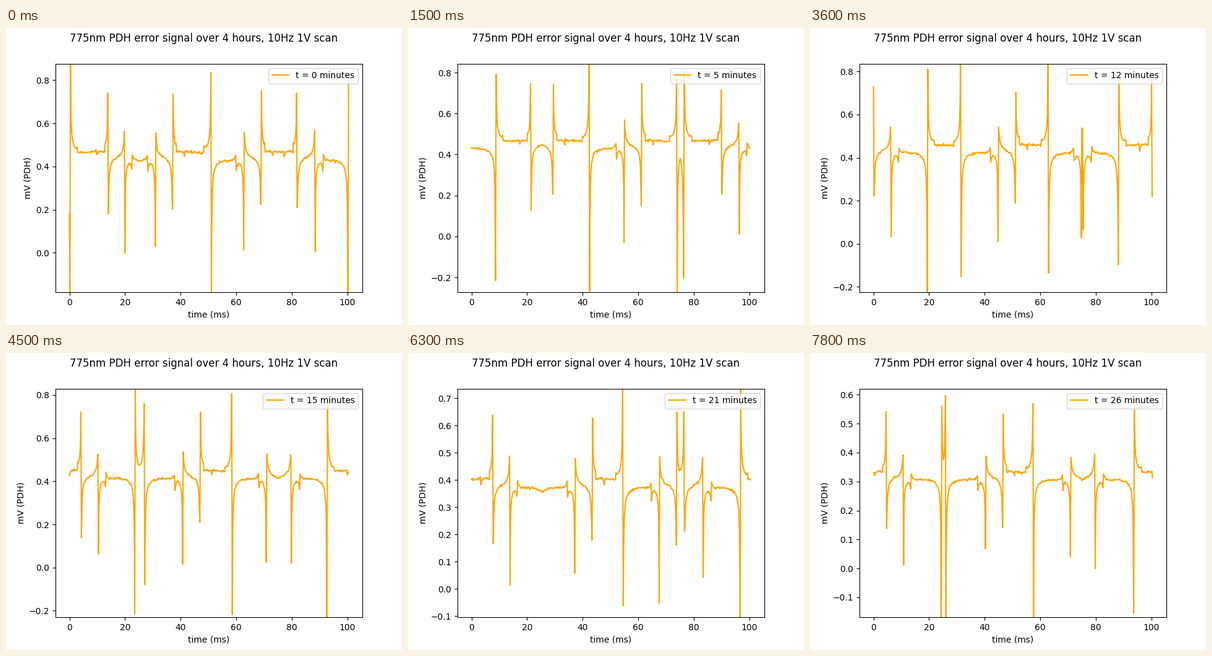
Write a matplotlib script that moves like this. It is 640 px wide and 480 px high and loops after 8000 ms.

```python
import numpy as np
import matplotlib.pyplot as plt
from matplotlib.animation import FuncAnimation

STEPS_PER_MINUTE = 3
LAST_MINUTE = 26
T_END = 100.4
TURN_1, TURN_2 = 25.2, 75.1  # ends of the triangular scan, ms

# Slow drift of the resonances and of the view, interpolated in between
KEY_MINUTES = [0, 5, 9, 12, 17, 21, 26]
DRIFT = [62.8, 55, 50.3, 44.95, 38.1, 37.3, 40.4]
Y_LOW = [-.183, -.273, -.156, -.225, -.235, -.104, -.169]
Y_HIGH = [.877, .8435, .8705, .8365, .825, .736, .621]


def at_minute(minute, values):
    return np.interp(minute, KEY_MINUTES, values)


def first_slope(u):
    """Time at which the first slope passes the point u of the middle one."""
    return 51.3 - .9 * np.exp(-(u - TURN_1) / 8) - u


def last_slope(u):
    return 151.4 - 1.2 * np.exp(-(TURN_2 - u) / 8) - u


def fold(t):
    """Map time to the equivalent point of the middle slope."""
    u = np.linspace(TURN_1, TURN_2, 1500)
    first = np.interp(t, first_slope(u)[::-1], u[::-1])
    last = np.interp(t, last_slope(u)[::-1], u[::-1])
    return np.where(t < TURN_1, first, np.where(t > TURN_2, last, t))


def resonances(minute):
    """(position, kind) of every resonance along the middle slope."""
    b = at_minute(minute, DRIFT)
    a = b - 11.8 - 2.6 * np.sin(np.pi / 2 * minute / LAST_MINUTE)
    modes = [(a + 31.5 * n, "A") for n in range(-1, 3)]
    for shift in (-31.8, 0, 29.4 + .045 * minute):
        modes += [(b + shift, "B"), (b + 6.2 + shift, "C")]
    return sorted(modes)


def sideband(x, outer, outer_width, inner, inner_width):
    """Jump at x = 0 with separate exponential flanks."""
    flank = np.exp(-np.abs(x) / np.where(x > 0, outer_width, inner_width))
    return np.where(x > 0, outer, inner) * flank


def gap_level(kind, p, q):
    """Signal at distance p after one resonance and q before the next."""
    p, q = np.maximum(p, .05), np.maximum(q, .05)
    if kind == "A":
        return .447 - .07 / p - .04 / q + sideband(q - 2.85, .035, .5, -.055, .35)
    if kind == "B":
        return .443 + .04 / (p + .2) - .045 / q
    return (.453 + .045 / (p + .08) + .06 / (q + .05)
            + sideband(p - 1.25, -.025, .8, .016, .3)
            + sideband(p - 4.35, .004, .4, -.03, .3)
            + sideband(q - 2.6, -.014, 2, .014, .4))


def spike(kind, gain, rng):
    """Lowest and highest sample of one crossing."""
    if kind == "A":
        return rng.uniform(-.35, -.05), gain * (.79 + rng.exponential(.06))
    if kind == "B":
        return rng.normal(.02, .03), gain * rng.normal(.555, .007)
    return gain * rng.normal(.2, .025), gain * rng.normal(.745, .015)


def trace(minute):
    rng = np.random.default_rng(minute)
    gain = 1 - .29 * (minute / LAST_MINUTE) ** 3.5
    modes = resonances(minute)

    t = np.arange(0, T_END + .01, .2)
    u = fold(t)
    y = np.zeros_like(t)
    for (start, kind), (end, _) in zip(modes, modes[1:]):
        inside = (u >= start) & (u < end)
        y[inside] = gap_level(kind, u[inside] - start, end - u[inside])
    y = gain * (y + rng.normal(0, .0028, t.size))

    keep = np.ones(t.size, bool)
    spike_t, spike_y = [], []
    for u_mode, kind in modes:
        if not TURN_1 < u_mode < TURN_2:
            continue
        # The scan direction flips the order of the two extremes
        for when, backward in ((first_slope(u_mode), True), (u_mode, False),
                               (last_slope(u_mode), True)):
            low, high = spike(kind, gain, rng)
            if 0 < when < T_END:
                keep &= np.abs(t - when) > .17
                spike_t += [when - .1, when + .1]
                falling = (kind == "A") != backward
                spike_y += [high, low] if falling else [low, high]

    t = np.concatenate([t[keep], spike_t])
    y = np.concatenate([y[keep], spike_y])
    order = np.argsort(t, kind="stable")
    return t[order], y[order]


fig, ax = plt.subplots(figsize=(6.4, 4.8), dpi=100)
fig.suptitle("775nm PDH error signal over 4 hours, 10Hz 1V scan", y=.9825)
line, = ax.plot([], [], color="orange", label="t = 0 minutes")
legend = ax.legend(loc="upper right")
ax.set_xlabel("time (ms)")
ax.set_ylabel("mV (PDH)")
ax.set_xlim(-.05 * T_END, 1.05 * T_END)


def update(step):
    minute = step // STEPS_PER_MINUTE
    line.set_data(*trace(minute))
    ax.set_ylim(at_minute(minute, Y_LOW), at_minute(minute, Y_HIGH))
    legend.get_texts()[0].set_text(f"t = {minute} minutes")
    return line,


anim = FuncAnimation(fig, update, frames=80, interval=100, repeat=True,
                     repeat_delay=0)
plt.show()
```
